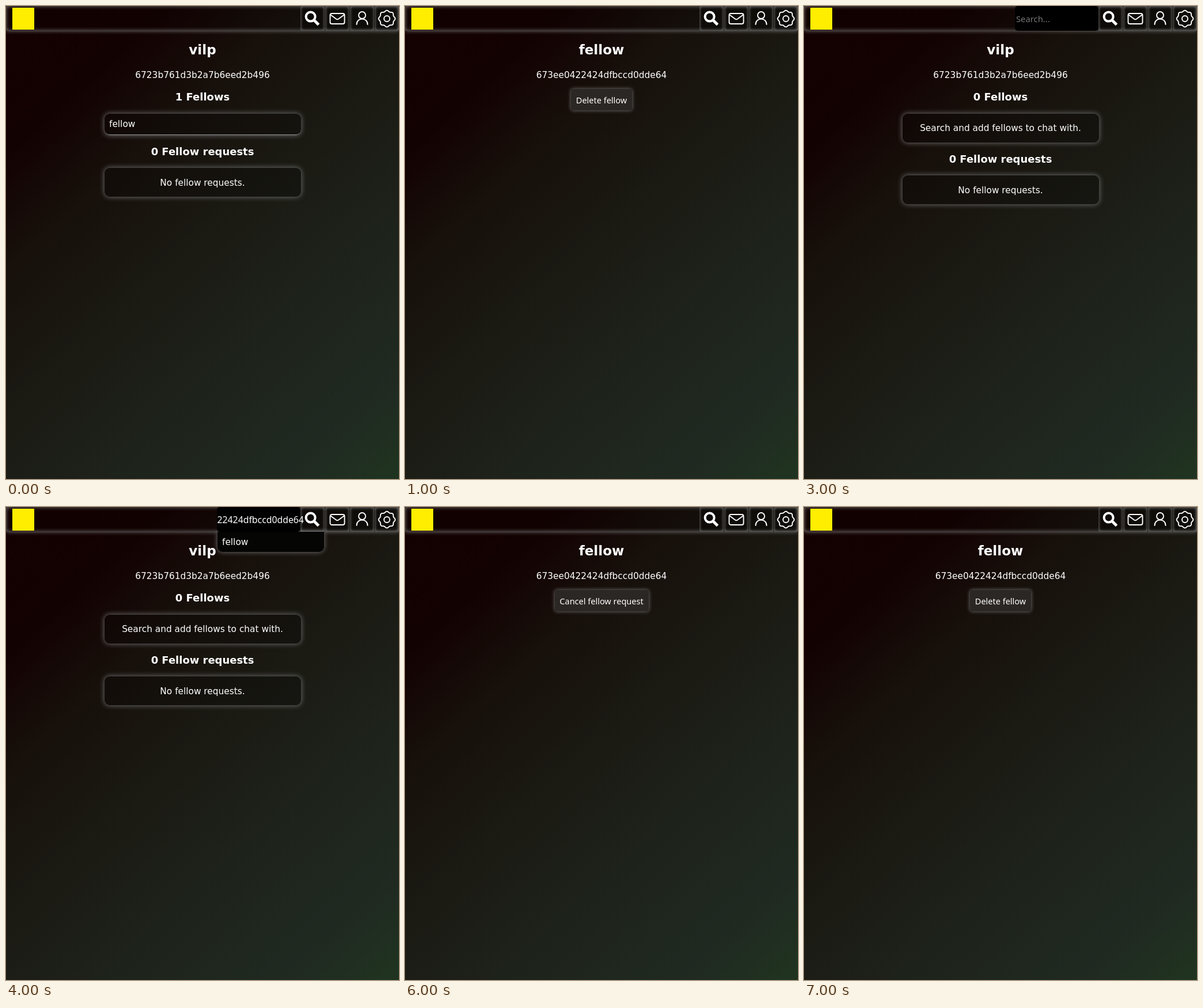
An HTML page that plays this animation: 682x821 px, repeating every 8 s.

```html
<!DOCTYPE html>
<html lang="en">
<head>
<meta charset="utf-8">
<title>Profile page</title>
<style>
  html, body { margin: 0; width: 100%; height: 100%; overflow: hidden; background: #140000; }
  #stage {
    position: absolute; left: 0; top: 0; width: 682px; height: 821px; overflow: hidden;
    background: linear-gradient(138deg, #140000, #130202 18%, #17100b 32%, #1b1b14 52%, #1e241c 71%, #202a21 88%, #203420);
    color: #fff;
  }
  #stage div, svg { position: absolute; box-sizing: border-box; }
  svg { left: 0; top: 0; width: 682px; height: 821px; overflow: hidden; }
  text { fill: #fff; font: 15.36px "DejaVu Sans", sans-serif; white-space: pre; }
  .mid { text-anchor: middle; }
  .h2 { font-size: 23.04px; font-weight: bold; }
  .h3 { font-size: 17.97px; font-weight: bold; }
  .ui { font: 14.5px "Noto Sans", sans-serif; }
  .hint { fill: #757575; font-size: 14.8px; }
  .field { font-size: 15.8px; }
  .bar { border-radius: 4px; background: rgba(0, 0, 0, .12); box-shadow: 0 0 7px #777, inset 0 0 7px #777; }
  .tab { border-radius: 4px; background: rgba(0, 0, 0, .3); box-shadow: inset 0 0 5px #888; }
  .card { border-radius: 9px; background: linear-gradient(rgba(0, 0, 0, .22), rgba(0, 0, 0, .22)); box-shadow: 0 0 9px 1px #666; }
  .row { border-bottom: 1px solid #999; }
  .button { border-radius: 4px; background: #2b2724; box-shadow: 0 0 6px #777; }
  .input { border-radius: 5px; background: #000; }
  .list { border-radius: 0 0 9px 9px; background: #050504; box-shadow: 0 0 8px #777; }
  .logo { background: #fe0; }
</style>
</head>
<body>
<div id="stage">
  <div id="page"></div>
  <div id="header"></div>
  <div id="search"></div>
</div>
<script>
const MID = 341;
const ME = { name: "vilp", id: "6723b761d3b2a7b6eed2b496" };
const OTHER = { name: "fellow", id: "673ee0422424dfbccd0dde64" };

const box = (cls, x, y, w, h) =>
  `<div class="${cls}" style="left:${x}px;top:${y}px;width:${w}px;height:${h}px"></div>`;
const label = (cls, x, y, str) => `<text class="${cls}" x="${x}" y="${y}">${str}</text>`;
const centred = (cls, y, str) => label("mid " + cls, MID, y, str);
const svg = body => `<svg viewBox="0 0 682 821">${body}</svg>`;
const card = (y, h, cls = "") => box("card " + cls, 171, y, 341, h);
const title = user => centred("h2", 84, user.name) + centred("", 125, user.id);

function ownPage(count) {
  const shift = count ? 0 : 13;
  const first = count
    ? label("", 179, 210, OTHER.name)
    : centred("", 217, "Search and add fellows to chat with.");
  return card(187, 36.5 + shift, count ? "row" : "") + card(281 + shift, 50) + svg(
    title(ME) + centred("h3", 164, count + " Fellows") + first +
    centred("h3", 258.5 + shift, "0 Fellow requests") +
    centred("", 311.5 + shift, "No fellow requests."));
}

function otherPage(action, width) {
  return box("button", MID - width / 2, 144, width, 37) +
    svg(title(OTHER) + centred("ui", 168.5, action));
}

const field = box("input", 366, 0, 145, 43);
const emptySearch = field + svg(label("ui hint", 368, 28, "Search..."));
const filledSearch = box("list", 367, 43, 185, 34.5) + field + svg(
  label("ui field", 366.5, 28, OTHER.id.slice(7)) + label("", 375, 66, OTHER.name));

function gear(cx, cy) {
  let d = "";
  for (let i = 0; i < 96; i++) {
    const a = i / 96 * Math.PI * 2, r = 13.4 + Math.cos(8 * a);
    d += (i ? "L" : "M") + (cx + r * Math.cos(a)).toFixed(2) + " " + (cy + r * Math.sin(a)).toFixed(2);
  }
  return `<path d="${d}Z"/><circle cx="${cx}" cy="${cy}" r="5"/>`;
}

function header() {
  const tabs = [511, 554, 597, 640].map(x => box("tab", x, 0, 42, 43)).join("");
  return box("bar", 0, 0, 682, 43) + tabs + box("logo", 10.5, 2.5, 38, 38) + svg(
    `<g fill="none" stroke="#fff" stroke-width="1.9" stroke-linecap="round" stroke-linejoin="round">
      <g stroke-width="4"><circle cx="528.6" cy="18.6" r="8"/><path d="M535 25l7.5 7.5" stroke-width="5" stroke-linecap="butt"/></g>
      <rect x="562.5" y="13" width="25" height="18" rx="3"/><path d="M563.5 15.5l9.5 7q2 1.4 4 0l9.5-7"/>
      <circle cx="618" cy="16" r="6"/><path d="M608.5 32c0-5.500 4-9.500 9.500-9.500s9.500 4 9.500 9.500"/>
      ${gear(661, 22)}
    </g>`);
}

const remove = otherPage("Delete fellow", 106);
const send = otherPage("Send fellow request", 152);
const cancel = otherPage("Cancel fellow request", 163);

// One entry per second: page, search overlay
const steps = [
  [ownPage(1), ""],
  [remove, ""],
  [send, ""],
  [ownPage(0), emptySearch],
  [ownPage(0), filledSearch],
  [send, ""],
  [cancel, ""],
  [remove, ""],
];

const $ = id => document.getElementById(id);
$("header").innerHTML = header();
const start = performance.now();
let shown = -1;

function draw() {
  const step = Math.floor((performance.now() - start) / 1000) % steps.length;
  if (step !== shown) {
    shown = step;
    [$("page").innerHTML, $("search").innerHTML] = steps[step];
  }
  requestAnimationFrame(draw);
}
draw();
</script>
</body>
</html>
```
